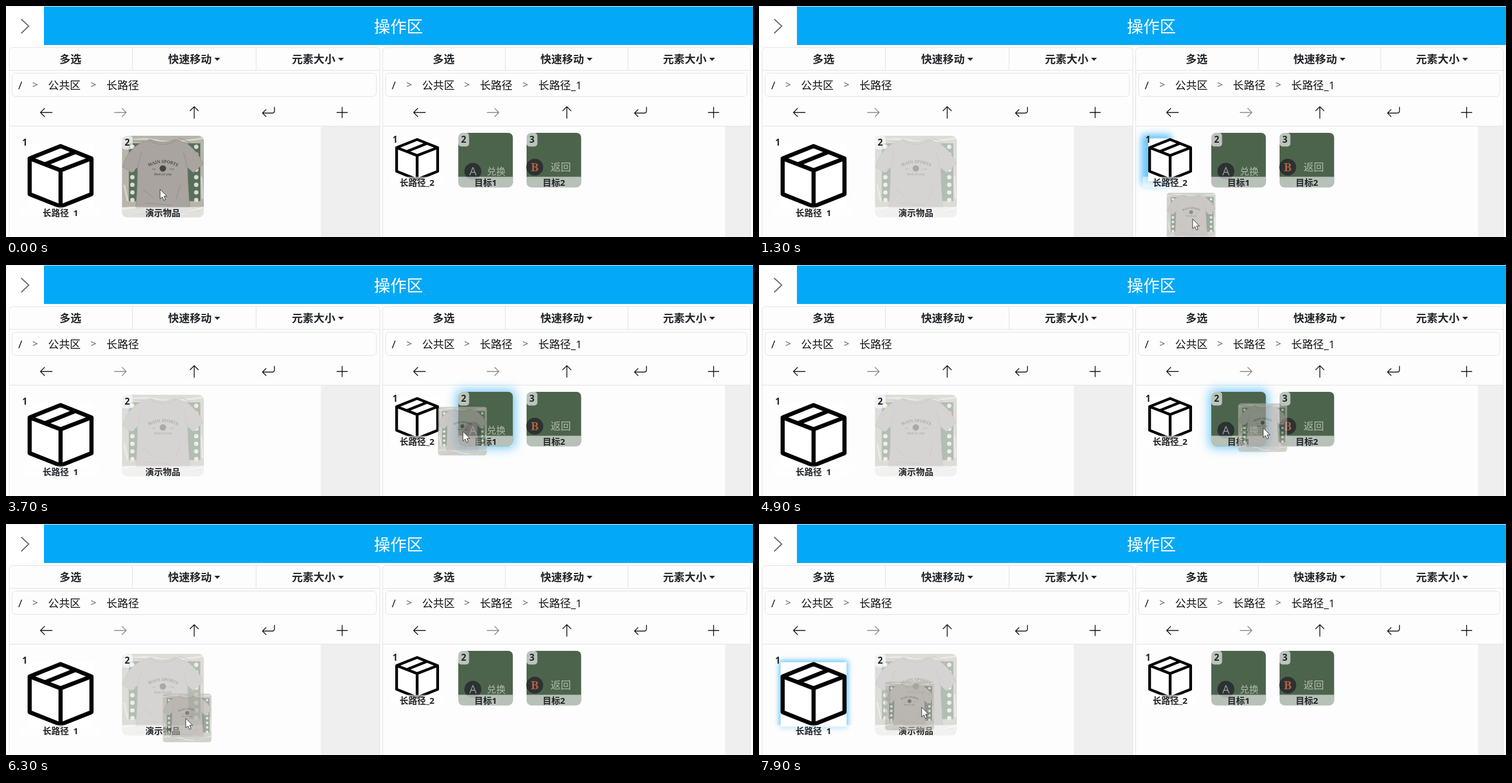
Recreate the animation shown at these times as an HTML page. Size 1280 by 397 pixels, loop 8000 ms.

```html
<!DOCTYPE html>
<html lang="zh-CN">
<head>
<meta charset="utf-8">
<title>操作区</title>
<style>
  html, body { margin: 0; width: 100%; height: 100%; overflow: hidden; background: #fdfdfd; }
  svg { display: block; }
  text { font-family: "Open Sans", "Noto Sans CJK SC", "Noto Sans CJK", sans-serif; fill: #212529; white-space: pre; }
  .line { fill: none; stroke: #dfe2e5; }
  .icon { fill: none; stroke: #111; stroke-width: 1.4; stroke-linecap: round; stroke-linejoin: round; }
  .mid { text-anchor: middle; }
  .bold { font-weight: 700; }
</style>
</head>
<body>
<svg id="stage" width="1280" height="397" viewBox="0 0 1280 397">
  <defs>
    <clipPath id="round"><rect width="140" height="140" rx="9"/></clipPath>
    <symbol id="photo" viewBox="0 0 140 140">
      <g clip-path="url(#round)">
        <rect width="140" height="140" fill="#b7b5ab"/>
        <path d="M0 10Q40 2 60 8T140 4M0 126Q30 118 60 130T140 122M4 84L10 112M136 70L138 108" fill="none" stroke="#d6d4cb" stroke-width="3"/>
        <path d="M0 5L38 10M96 3L118 12M20 136L60 131M90 134L134 128" fill="none" stroke="#96958b" stroke-width="1.2"/>
        <rect x="12" y="13" width="122" height="99" fill="#58705b"/>
        <g id="dots" fill="#dcdcd2"></g>
        <path d="M48 6Q70 16 92 6L112 14Q132 30 139 48L122 63L112 54Q113 90 116 122L24 124Q27 90 27 54L16 63L1 53Q8 28 28 15Z" fill="#a9a49f" stroke="#918d88" stroke-width=".8"/>
        <path d="M47 8Q70 22 93 8M28 54Q29 40 34 28M111 54Q109 40 105 28M36 92L54 106M100 84L92 110M40 115L84 119" fill="none" stroke="#97928d" stroke-width="1.2"/>
        <path id="arc" d="M46 53Q70 40 95 53" fill="none"/>
        <text class="bold" font-size="7.2" style="fill:#4a4a48;font-family:'Noto Serif',serif"><textPath href="#arc" startOffset="50%" text-anchor="middle">MAIN SPORTS</textPath></text>
        <circle cx="70" cy="56" r="5.5" fill="#444544"/>
        <text class="mid" x="55" y="59" font-size="4" style="fill:#555">EST</text>
        <text class="mid" x="85" y="59" font-size="4" style="fill:#555">1990</text>
        <text class="mid" x="70" y="68" font-size="5" font-style="italic" style="fill:#444">Made for play</text>
      </g>
    </symbol>
    <symbol id="box" viewBox="0 0 16 16" overflow="visible">
      <path d="M8 .6L15.5 3.6V12.3L8 15.3L.5 12.3V3.6ZM.5 3.6L8 6.5L15.5 3.6M8 6.5V15.3M4.3 5L11.5 2.1" fill="none" stroke="#000" stroke-linejoin="round"/>
    </symbol>
  </defs>
  <g id="ui"></g>
  <use id="ghost" href="#photo" width="84" height="84" opacity=".6"/>
  <path id="cursor" d="M0 0V16.5L3.8 13L6.4 19L9.2 17.8L6.7 12H11.8Z" fill="#fff" stroke="#333"/>
</svg>
<script>
const LOOP = 8000, DRAG_START = 500;
const $ = id => document.getElementById(id);

const text = (x, y, str, size, cls = '', style = '') =>
  `<text x="${x}" y="${y}" font-size="${size}" class="${cls}" style="${style}">${str}</text>`;
const rect = (x, y, w, h, fill, rx = 0, more = '') =>
  `<rect x="${x}" y="${y}" width="${w}" height="${h}" fill="${fill}" rx="${rx}" ${more}/>`;
const icon = (x, d, color = '#111') =>
  `<path class="icon" transform="translate(${x} 183)" d="${d}" style="stroke:${color}"/>`;

// Each glow: x, y, width, height, blur, time on, time off
const glows = [
  [658, 223, 46, 82, 6, 1000, 1500],
  [667, 227, 75, 72, 5, 1700, 3000],
  [775, 218, 94, 93, 9, 3200, 5100],
  [892, 218, 94, 93, 9, 5150, 5600],
  [37, 237, 113, 112, 4.5, 6800, 8100]
];

// Pointer stops: time, x, y
const stops = [
  [0, 264, 315], [500, 264, 315], [1000, 680, 282], [1300, 743, 366],
  [1700, 743, 366], [2200, 708, 276], [2700, 741, 290], [3200, 741, 290],
  [3700, 783, 286], [4200, 783, 286], [4900, 864, 280], [5200, 864, 280],
  [5500, 930, 278], [6300, 308, 334], [7000, 95, 300], [7500, 95, 300],
  [8100, 340, 320]
];

function panel(x, right, cells, centers, crumbs, scrollX) {
  const bounds = [x, ...cells, right];
  const labels = ['多选', '快速移动', '元素大小'];
  let s = rect(x, 71.5, right - x, 340, '#fff', 6, 'class="line"')
    + rect(scrollX, 207, right - scrollX - .5, 190, '#efefef')
    + `<path class="line" d="M${x} 110.5H${right}M${x} 206.5H${right}M${cells[0]} 72V110M${cells[1]} 72V110"/>`
    + rect(x + 5, 115.5, right - x - 11, 40, '#fff', 6, 'class="line"');
  labels.forEach((label, i) => {
    const mid = (bounds[i] + bounds[i + 1]) / 2 - (i ? 7.5 : .5);
    s += text(mid, 98.2, label, 18.67, 'mid bold');
    if (i) s += `<path d="M${mid + 42} 89h10l-5 5.2z" fill="#212529"/>`;
  });
  crumbs.forEach(([cx, label]) => {
    s += label == '>' ? text(cx, 141, '&gt;', 17, '', 'fill:#555') : text(cx, 142.7, label, 18.67, '', 'fill:#111');
  });
  const [a, b, c, d, e] = centers;
  return s + icon(a, 'M10 0H-9.5M-3 -7L-10 0L-3 7')
    + icon(b, 'M-10 0H9.5M3 -7L10 0L3 7', '#888')
    + icon(c, 'M0 10V-9.5M-7 -3L0 -10L7 -3')
    + icon(d, 'M10.5 -9V-3Q10.5 1 6.5 1H-9.5M-4 -5L-10 1L-4 7')
    + icon(e, 'M-9 0H9M0 -9V9');
}

function tile(x, y, size, number, label, body, solid) {
  const band = `M${x} ${y + size - 18}h${size}v12q0 6 -6 6h${12 - size}q-6 0 -6 -6z`;
  return body
    + (solid ? rect(x, y, 18.5, 23.5, 'rgba(255,255,255,.62)', 5) : '')
    + `<path d="${band}" fill="rgba(255,255,255,.6)"/>`
    + text(x + 9.2, y + 17.3, number, 15.5, 'mid bold')
    + text(x + size / 2, y + size - 2.6, label, 15, 'mid bold');
}

const boxIcon = (x, y, size) =>
  rect(x, y + 1, size, size * .98, '#fff') + `<use href="#box" x="${x}" y="${y}" width="${size}" height="${size}"/>`;

const card = (x, cx, cy, letter, color, font, tx, label, size) =>
  rect(x, 218, 93.5, 93.5, '#4d644c', 8)
  + `<circle cx="${cx}" cy="${cy}" r="14.5" fill="#2c3132"/>`
  + text(cx, cy + 7, letter, 20, 'mid', `fill:${color};${font}`)
  + text(tx, cy + 6.3, label, size, '', 'fill:#afbbad;font-weight:500');

let dots = '';
for (let y = 19; y < 112; y += 13)
  for (const x of [18, 127]) dots += `<circle cx="${x}" cy="${y}" r="3.7"/>`;
$('dots').innerHTML = dots;

$('ui').innerHTML =
  rect(0, 1, 65, 66, '#fff') + rect(65, 1, 1215, 66, '#03a9f6')
  + '<path d="M0 .5H1280" stroke="#e9edf0"/>'
  + '<path d="M26 22.5L39 34.5L26 47" fill="none" stroke="#666" stroke-width="1.8"/>'
  + text(672.5, 45.8, '操作区', 28, 'mid', 'fill:#fff')
  + panel(5.5, 640.5, [216.5, 428.5], [69, 196, 322.5, 449.5, 576],
      [[21, '/'], [45, '>'], [72, '公共区'], [145, '>'], [172, '长路径']], 539.5)
  + panel(645.5, 1275.5, [855.5, 1065.5], [708.5, 834.5, 961, 1087, 1212.5],
      [[661, '/'], [686, '>'], [713, '公共区'], [785, '>'], [812, '长路径'], [885, '>'], [912, '长路径_1']], 1232)
  + glows.map(([x, y, w, h, blur]) =>
      rect(x - 3, y - 3, w + 6, h + 6, '#3db5fb', 6, `class="glow" style="filter:blur(${blur}px)"`)).join('')
  + tile(23, 223, 140.5, 1, '长路径\u20021', boxIcon(37, 236.5, 113))
  + tile(198.5, 223, 140.5, 2, '演示物品', '<use id="item" href="#photo" x="198.5" y="223" width="140.5" height="140.5"/>', true)
  + tile(657.5, 218, 93.5, 1, '长路径_2', boxIcon(667, 226.5, 75))
  + tile(775, 218, 93.5, 2, '目标1', card(775, 800, 284, 'A', '#8fa097', '', 824, '兑换', 16), true)
  + tile(892, 218, 93.5, 3, '目标2', card(892, 906, 277, 'B', '#b0603f', 'font-weight:700;font-family:"Noto Serif",serif'.replace(/"/g, "'"), 933, '返回', 17.5), true);

const glowNodes = document.querySelectorAll('.glow');
const clamp = v => Math.max(0, Math.min(1, v));

function pointer(t) {
  const i = Math.max(1, stops.findIndex(s => s[0] > t));
  const [t0, x0, y0] = stops[i - 1], [t1, x1, y1] = stops[i];
  const k = (1 - Math.cos(Math.PI * clamp((t - t0) / (t1 - t0)))) / 2;
  return [x0 + (x1 - x0) * k, y0 + (y1 - y0) * k];
}

function draw(now) {
  const t = Math.floor(now % LOOP / 100) * 100;
  const dragging = t >= DRAG_START;
  const [x, y] = pointer(t), [gx, gy] = pointer(t - 35);
  $('cursor').setAttribute('transform', `translate(${x} ${y})`);
  $('ghost').setAttribute('transform', `translate(${gx - 42.5} ${gy - 42.5})`);
  $('ghost').style.display = dragging ? '' : 'none';
  $('item').setAttribute('opacity', dragging ? .45 : 1);
  glows.forEach(([, , , , , on, off], i) => {
    glowNodes[i].style.opacity = .75 * clamp((t - on) / 200) * clamp((off - t) / 200);
  });
}

const start = performance.now();
function loop() {
  draw(performance.now() - start);
  requestAnimationFrame(loop);
}
loop();
</script>
</body>
</html>
```
